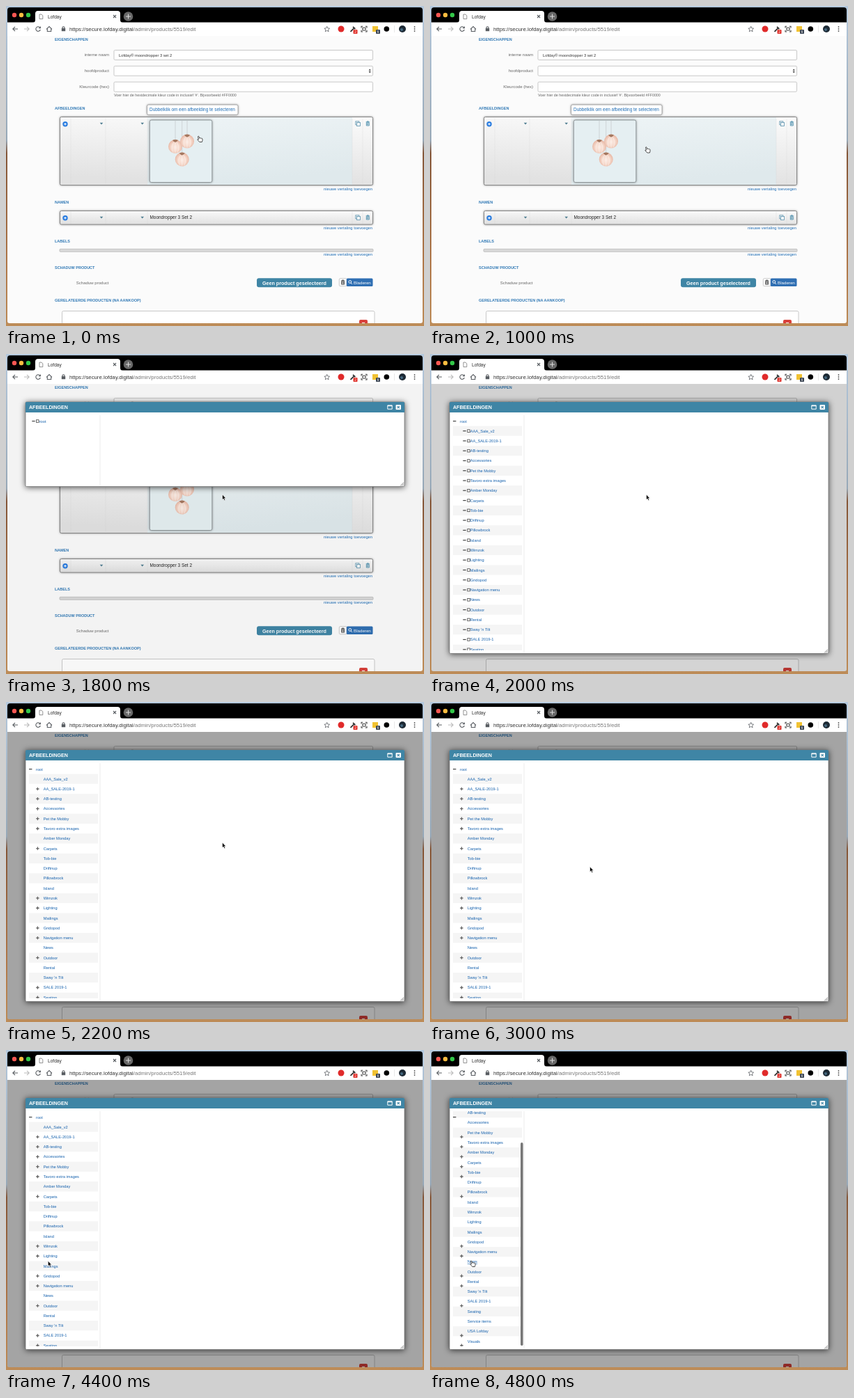
Recreate the animation shown at these times as an HTML page. Size 600 by 460 pixels, loop 5 s.

```html
<!DOCTYPE html>
<html lang="nl">
<head>
<meta charset="utf-8">
<title>Beheer</title>
<style>
html, body { margin: 0; width: 100%; height: 100%; overflow: hidden; }
svg { display: block; width: 600px; height: 460px; font: 6px "Liberation Sans", Arial, sans-serif; }
text { white-space: pre; }
.head { font-weight: bold; font-size: 5.5px; fill: #2f78b5; }
.label { font-size: 6.05px; fill: #666; text-anchor: end; }
.link { font-size: 5.75px; fill: #1f6db5; text-anchor: end; }
.field { fill: #fff; stroke: #bcbcbc; stroke-width: .8; }
.row { fill: url(#metal); stroke: #858585; stroke-width: 1; filter: drop-shadow(0 0 1.5px #0006); }
.dots { stroke: #d4d4d4; stroke-width: .6; stroke-dasharray: 1 1; }
.icon { fill: none; stroke: #5a5e63; stroke-width: 1.1; }
#tree { font-size: 5.7px; fill: #1561ad; }
</style>
</head>
<body>
<svg viewBox="0 0 600 460">
<defs>
  <linearGradient id="sky" x2="0" y2="1">
    <stop offset="0" stop-color="#b4c8dc"/><stop offset=".42" stop-color="#98a9b8"/>
    <stop offset=".46" stop-color="#86583a"/><stop offset=".8" stop-color="#b0784a"/><stop offset="1" stop-color="#bd8c58"/>
  </linearGradient>
  <linearGradient id="metal" x1="1" x2=".85" y2="1">
    <stop offset="0" stop-color="#fbfbfb"/><stop offset="1" stop-color="#e2e2e2"/>
  </linearGradient>
  <linearGradient id="hover" x2=".3" y2="1">
    <stop offset="0" stop-color="#eef4f6"/><stop offset="1" stop-color="#dfe9ec"/>
  </linearGradient>
  <radialGradient id="lamp" cy=".55">
    <stop offset="0" stop-color="#fbeae2"/><stop offset=".6" stop-color="#f6dacd"/><stop offset="1" stop-color="#e9bba9"/>
  </radialGradient>
  <clipPath id="view"><path d="M2 43H598V453Q598 456 595 456H5Q2 456 2 453Z"/></clipPath>
  <clipPath id="list"><rect x="28" y="88" width="107" height="338"/></clipPath>
  <g id="plus"><circle r="3.7" fill="#2b7de0"/><path d="M-1.8 0H1.8M0-1.8V1.8" stroke="#fff" stroke-width="1.1"/></g>
  <path id="caret" d="M-2.3-1.2H2.3L0 1.4Z" fill="#4d7c90"/>
  <g id="copy" fill="#f4f7f8" stroke="#5b92ad" stroke-width=".8"><rect x="-3.2" y="-3.2" width="5" height="5"/><rect x="-1.6" y="-1.6" width="5" height="5"/></g>
  <path id="trash" d="M-2.7-2.2H2.7M-1-2.3V-3.2H1V-2.3M-2-1.2V3H2V-1.2ZM-.7-.5V2.3M.7-.5V2.3" fill="none" stroke="currentColor" stroke-width=".8"/>
  <g id="bulb"><circle r="10" fill="url(#lamp)"/><path d="M0-9Q-8 0-3 9M0-9Q8 0 3 9M0-9V10" fill="none" stroke="#fff" stroke-opacity=".5" stroke-width=".8"/><path d="M-4-9Q0-10.8 4-9Q2-6.5 0-6Q-2-6.5-4-9Z" fill="#a4775f"/></g>
  <path id="arrow" d="M0 0V7.4L1.7 5.9L2.9 8.6L4.2 8L3 5.5H5.2Z" fill="#000" stroke="#fff" stroke-width=".6"/>
  <path id="hand" d="M0 .6Q.8-.4 1.5.7L2.3 3.2Q3.3 2.3 3.9 3Q4.8 2.5 5.1 3.3Q6.2 3 6.4 4.1L6.5 6.2L5.8 8.5H2.3L-.7 5.2Q-.8 4 .9 4.8Z" fill="#fff" stroke="#222" stroke-width=".8"/>
</defs>

<rect width="600" height="460" fill="url(#sky)"/>

<!-- browser -->
<path d="M2 24V6Q2 2 6 2H594Q598 2 598 6V24Z"/>
<rect x="2" y="23.5" width="596" height="19.5" fill="#fff"/>
<path d="M38 24Q42 24 42 20V11Q42 7 46 7H160Q164 7 164 11V20Q164 24 168 24Z" fill="#fff"/>
<circle cx="12" cy="13" r="3.2" fill="#fc5753"/><circle cx="22" cy="13" r="3.2" fill="#fdbc40"/><circle cx="32" cy="13" r="3.2" fill="#33c748"/>
<path d="M48 12H51L52.8 13.8V18.6H48Z" fill="#fff" stroke="#666" stroke-width=".7"/>
<text x="60" y="17.5" font-size="6.6" fill="#333">Lofday</text>
<path d="M154 13L158 17M158 13L154 17" class="icon" stroke-width=".9"/>
<circle cx="175.5" cy="15" r="6.8" fill="#686868"/><path d="M172 15H179M175.5 11.5V18.5" stroke="#ddd"/>
<g class="icon">
  <path d="M17 33H10M13 29.8L9.8 33L13 36.2"/>
  <path d="M26 33H33M30 29.8L33.2 33L30 36.2" stroke="#bbb"/>
  <path d="M48.7 31A3.3 3.3 0 1 0 49.3 34M49.4 29.4V31.7H47"/>
  <path d="M58 33.3L62 29.6L66 33.3M59.3 32.7V36.5H64.7V32.7"/>
  <path d="M81 32V30.7Q82.5 28.7 84 30.7V32"/>
  <path d="M460.7 29.3L461.8 31.9L464.6 32.2L462.5 34L463.1 36.8L460.7 35.3L458.3 36.8L458.9 34L456.8 32.2L459.6 31.9Z" stroke-width=".8"/>
  <path d="M494.5 36.8L499.5 31.8M498 29.8L501.3 33" stroke="#333" stroke-width="1.8"/>
  <path d="M510 31.5V29.3H512.2M515.8 29.3H518V31.5M518 34.7V37H515.8M512.2 37H510V34.7M512 31.2H516V35H512Z" stroke="#444"/>
</g>
<rect x="79.8" y="32" width="5.4" height="4.2" fill="#5a5e63"/>
<text x="91" y="36" font-size="7.8" fill="#333">https://secure.lofday.digital<tspan fill="#777">/admin/products/5519/edit</tspan></text>
<circle cx="481" cy="33" r="4.5" fill="#e02a2a"/>
<rect x="498.5" y="34" width="6" height="6" rx="1" fill="#e0322c"/>
<rect x="526" y="29" width="8" height="8" fill="#f1c232"/><rect x="531" y="34" width="6" height="6" rx="1" fill="#3c4654"/>
<text x="500.3" y="38.7" font-size="4.5" fill="#fff">2</text><text x="532.8" y="38.7" font-size="4.5" fill="#fff">6</text>
<circle cx="546.3" cy="33" r="3.8"/>
<path d="M557.5 28V38" stroke="#ddd" stroke-width=".7"/>
<circle cx="569" cy="33" r="5" fill="#1d2a35"/><circle cx="568" cy="34" r="2" fill="#44687f"/>
<g fill="#555"><circle cx="586.5" cy="30" r=".9"/><circle cx="586.5" cy="33" r=".9"/><circle cx="586.5" cy="36" r=".9"/></g>

<!-- page -->
<g clip-path="url(#view)">
  <rect x="2" y="43" width="596" height="414" fill="#fbfbfb"/>
  <text class="head" x="70" y="50">EIGENSCHAPPEN</text>
  <text class="label" x="148" y="72">interne naam</text>
  <text class="label" x="148" y="95">hoofdproduct</text>
  <text class="label" x="148" y="118">Kleurcode (hex)</text>
  <rect class="field" x="155" y="63.5" width="371.5" height="14" rx="1.5"/>
  <rect class="field" x="155" y="86.3" width="371.5" height="14" rx="1.5"/>
  <rect class="field" x="155" y="109.2" width="371.5" height="14" rx="1.5"/>
  <text x="162" y="72.8" font-size="5.75" fill="#333">Lofday® moondropper 3 set 2</text>
  <path d="M520.6 92.8L522.2 90.5L523.8 92.8ZM520.6 94L522.2 96.3L523.8 94Z" fill="#333"/>
  <text x="155" y="129.6" font-size="5.35" fill="#666">Voer hier de hexidecimale kleur code in inclusief '#'. Bijvoorbeeld #FF0000</text>

  <text class="head" x="70" y="149">AFBEELDINGEN</text>
  <rect class="row" x="77.5" y="159.5" width="449" height="98" rx="2"/>
  <rect x="203" y="160" width="294" height="97" fill="url(#hover)"/>
  <path class="dots" d="M93 162V256M143 162V256M203 162V256M497 162V256M512 162V256"/>
  <use href="#plus" x="85" y="169.7"/><use href="#caret" x="137" y="169"/><use href="#caret" x="195.7" y="169"/>
  <use href="#copy" x="505" y="169"/><use href="#trash" x="519.3" y="169" color="#4288a8"/>
  <rect x="206.3" y="164" width="89.5" height="89.5" rx="2.5" fill="#e5eff2" stroke="#8b9296" stroke-width=".9" style="filter:drop-shadow(0 0 1.5px #0006)"/>
  <path d="M243 165V193M252.7 165V211M260 165V185" stroke="#c8ccce" stroke-width=".8"/>
  <use href="#bulb" x="243" y="202"/><use href="#bulb" x="260" y="194.5"/><use href="#bulb" x="252.7" y="220.5"/>
  <rect x="202.5" y="142" width="130.5" height="14.3" rx="2" fill="#fff" stroke="#999" stroke-width=".8" style="filter:drop-shadow(0 0 1.5px #0006)"/>
  <text x="206" y="151.4" font-size="6.43" fill="#1f6db5">Dubbelklik om een afbeelding te selecteren</text>
  <text class="link" x="526" y="265">nieuwe vertaling toevoegen</text>

  <text class="head" x="70" y="284">NAMEN</text>
  <rect class="row" x="77.5" y="294.5" width="449" height="19.5" rx="2"/>
  <path class="dots" d="M93 296V313M143 296V313M203 296V313M497 296V313M512 296V313"/>
  <use href="#plus" x="85" y="304.8"/><use href="#caret" x="137" y="304"/><use href="#caret" x="195.7" y="304"/>
  <use href="#copy" x="505" y="304"/><use href="#trash" x="519.3" y="304" color="#4288a8"/>
  <text x="206.5" y="306" font-size="6.45" fill="#222">Moondropper 3 Set 2</text>
  <text class="link" x="526" y="321">nieuwe vertaling toevoegen</text>

  <text class="head" x="70" y="340">LABELS</text>
  <rect x="77" y="349.3" width="450" height="4" rx="1" fill="#d9d9d9" stroke="#b5b5b5" stroke-width=".7"/>
  <text class="link" x="526" y="359">nieuwe vertaling toevoegen</text>

  <text class="head" x="70" y="378.3">SCHADUW PRODUCT</text>
  <text class="label" x="147.5" y="400.3">Schaduw product</text>
  <rect x="360" y="391.3" width="108" height="13" rx="3" fill="#3f85a5"/>
  <text x="414" y="400.5" font-size="7.13" font-weight="bold" fill="#fff" text-anchor="middle">Geen product geselecteerd</text>
  <rect class="field" x="478.3" y="391.7" width="11" height="11" rx="1.5"/><use href="#trash" x="483.6" y="397.2" color="#333"/>
  <rect x="488.8" y="391.5" width="37.7" height="11.5" rx="1.5" fill="#2f6fb3"/>
  <g fill="none" stroke="#fff"><circle cx="493.8" cy="396.5" r="1.9"/><path d="M495.2 398L497 399.8"/></g>
  <text x="499" y="399.5" font-size="6.2" fill="#fff">Bladeren</text>

  <text class="head" x="70" y="424.6">GERELATEERDE PRODUCTEN (NA AANKOOP)</text>
  <rect class="field" x="80.5" y="438.5" width="448.5" height="30" rx="2" stroke="#ccc"/>
  <rect x="507" y="451" width="12" height="10" rx="2" fill="#d9413c"/><path d="M511 455.5H515" stroke="#fff"/>
  <rect id="shade" x="2" y="43" width="596" height="414"/>
</g>

<!-- dialog -->
<g id="dialog">
  <rect id="sheet" x="28" y="69" width="544" fill="#fff" stroke="#777" stroke-width=".8" rx="1.5" style="filter:drop-shadow(0 1px 4px #000a)"/>
  <path d="M28 84V70.5Q28 69 29.5 69H570.5Q572 69 572 70.5V84Z" fill="#3f85a5"/>
  <text x="33" y="79.2" font-size="7.1" font-weight="bold" fill="#fff">AFBEELDINGEN</text>
  <path d="M547.8 73.8H554.2V79.2H547.8ZM547.8 74.7H554.2" fill="none" stroke="#fff"/>
  <rect x="559.5" y="73" width="7.5" height="7" rx="1" fill="#fff"/><path d="M561.6 74.9L564.9 78.1M564.9 74.9L561.6 78.1" stroke="#3f85a5" stroke-width="1.1"/>
  <path id="split" stroke="#e6e6e6" stroke-width=".8"/>
  <path id="grip" d="M566 0L571-5M568 0L571-3M570 0L571-1" stroke="#666" stroke-width=".7"/>
  <g id="tree" clip-path="url(#list)"></g>
</g>
<use id="cursor"/>
</svg>
<script>
const $ = id => document.getElementById(id);
const set = (id, attrs) => { for (const k in attrs) $(id).setAttribute(k, attrs[k]); };

// steps of 200 ms
const STEP = 200, STEPS = 25, OPEN = 9, LOADING = 10, SCROLL = 23, LAST = 24;

// a leading + marks a folder that can be opened
const items = ("AAA_Sale_v2|+AA_SALE-2019-1|+AB-testing|+Accessories|+Pet the Mobby|+Tavoro extra images|" +
  "Amber Monday|+Carpets|Tob-bie|Driftnup|Pillowbrock|Island|+Wimzok|+Lighting|Mailings|+Gridopod|" +
  "+Navigation menu|News|+Outdoor|Rental|Sway 'n Tilt|+SALE 2019-1|+Seating|Service items|USA Lofday|Visuals").split("|");
const rowY = i => 110.6 + i * 14.28;

// cursor path: step, x, y
const path = [[0, 275.5, 187], [2, 309.5, 202.5], [8, 309.5, 202.5], [9, 310.5, 202], [12, 310.5, 202], [14, 266, 214.5],
  [15, 229.5, 236.8], [17, 170, 247], [18, 130, 297], [19, 79, 303], [22, 60.3, 303.3], [23, 60.3, 303.3], [24, 58.5, 303]];

function cursorAt(n) {
  const i = Math.max(1, path.findIndex(p => p[0] >= n));
  const [a, x, y] = path[i - 1], [b, u, v] = path[i];
  const k = (n - a) / (b - a);
  return { x: x + (u - x) * k, y: y + (v - y) * k };
}

const text = (x, y, s, extra = "") => `<text x="${x}" y="${y + 2}" ${extra}>${s}</text>`;
const minus = (x, y) => `<path d="M${x} ${y}h4.4" stroke="#444" stroke-width="1.2"/>`;
const box = (x, y) => `<rect x="${x}" y="${y - 1.8}" width="3.5" height="3.6" fill="#fff" stroke="#444" stroke-width=".8"/>`;
const cross = y => `<path d="M43.2 ${y}h4.4M45.4 ${y - 2.2}v4.4" stroke="#666" stroke-width="1.3"/>`;

function tree(n) {
  const y0 = 96.5;
  if (n === OPEN) return minus(37.3, y0) + box(43.5, y0) + text(47.7, y0, "root");
  const loading = n === LOADING, scroll = n === LAST ? 49 : n === SCROLL ? 24 : 0;
  let rows = text(43, y0 - scroll, "root"), signs = minus(33, y0);
  items.forEach((item, i) => {
    const y = rowY(i) - scroll, name = item.replace(/^\+/, "");
    if (i % 2 === 0) rows += `<rect x="33" y="${y - 7.1}" width="99" height="14.2" fill="#f5f5f5"/>`;
    const hot = n === LAST && name === "News" ? 'text-decoration="underline"' : "";
    rows += text(loading ? 57.7 : 53.7, y, name, hot);
    if (loading) rows += minus(47.3, y) + box(53.7, y);
    else if (item[0] === "+") signs += cross(rowY(i)); // signs stay put while the list scrolls
  });
  if (scroll) rows += `<rect x="130" y="${90 + scroll * .88}" width="3.6" height="292" rx="1.8" fill="#777"/>`;
  return rows + signs;
}

let last = -1;
function draw() {
  const n = Math.floor(performance.now() / STEP) % STEPS;
  if (n !== last) {
    last = n;
    const open = n >= OPEN, bottom = n === OPEN ? 190.5 : 430.5;
    set("shade", { opacity: !open ? 0 : n === OPEN ? .03 : n === LOADING ? .17 : .35 });
    set("dialog", { display: open ? "inline" : "none" });
    set("sheet", { height: bottom - 69 });
    set("split", { d: `M135 88V${bottom - 1}` });
    set("grip", { transform: `translate(0 ${bottom - 1})` });
    if (open) $("tree").innerHTML = tree(n);
    set("cursor", { href: !open || n === LAST ? "#hand" : "#arrow", ...cursorAt(n) });
  }
  requestAnimationFrame(draw);
}
draw();
</script>
</body>
</html>
```
